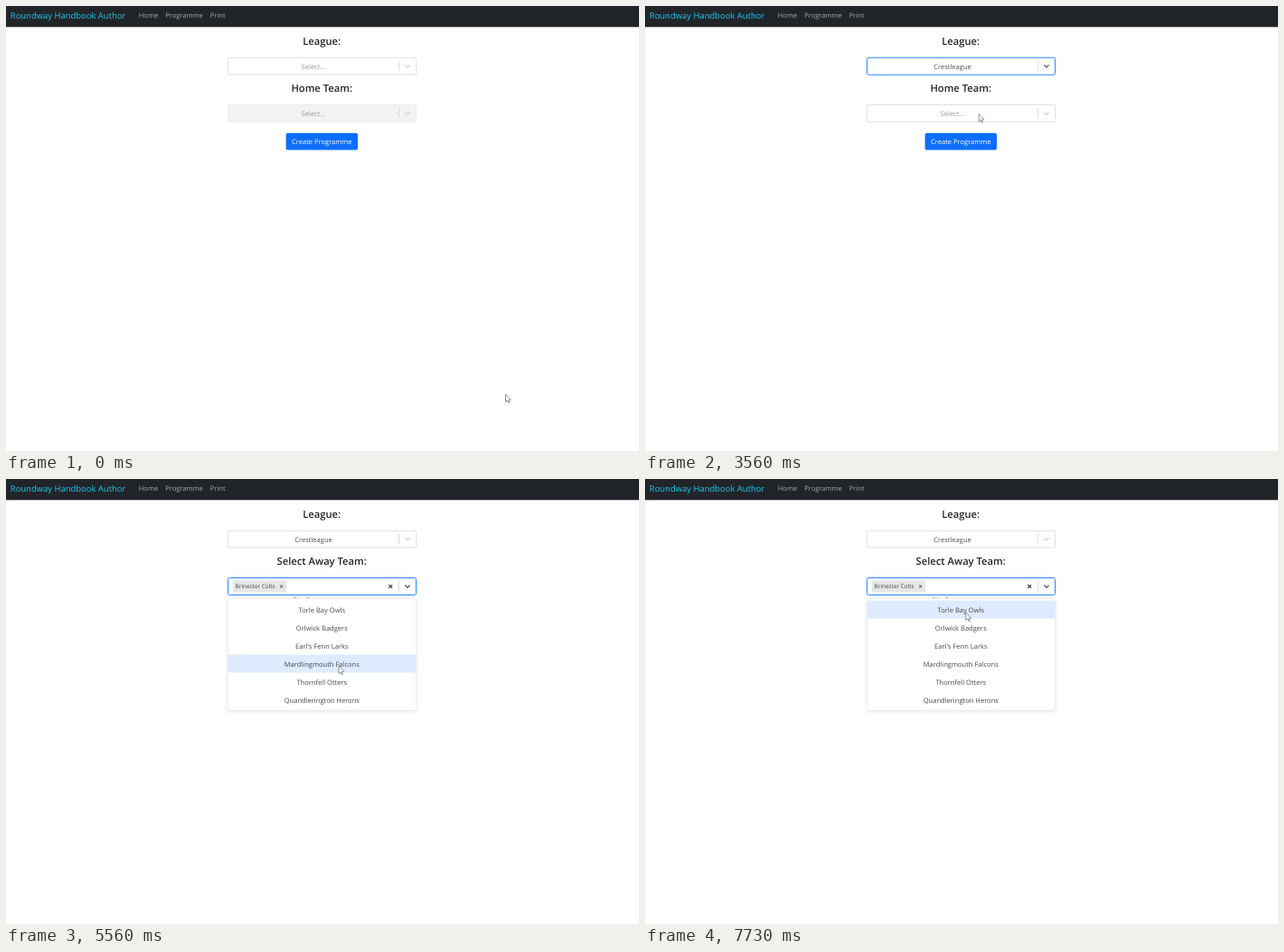
An HTML page that plays this animation: 700 by 493 pixels, repeating every 8 s.

```html
<!DOCTYPE html>
<html lang="en">
<head>
<meta charset="utf-8">
<title>Programme form</title>
<style>
  html, body { margin: 0; width: 100%; height: 100%; overflow: hidden; background: #fff; }
  svg { display: block; width: 700px; height: 493px; }
  text { font: 7.56px "Open Sans", "Noto Sans", sans-serif; text-rendering: geometricPrecision; fill: #484848; }
  .mid { text-anchor: middle; }
  .brand { font-size: 9.45px; font-weight: 500; fill: #1cc6f0; }
  .nav { fill: #a6a8aa; }
  .head { font-size: 11.2px; font-weight: 600; fill: #212529; }
  .small { font-size: 6.43px; }
  .menu { fill: #fff; stroke: #000; stroke-opacity: .1; stroke-width: .6; filter: drop-shadow(0 1.8px 2.5px rgba(0, 0, 0, .1)); }
</style>
</head>
<body>
<svg id="stage" viewBox="0 0 700 493"></svg>
<script>
const LOOP = 8000;
const NS = "http://www.w3.org/2000/svg";
const stage = document.getElementById("stage");
const LEAGUES = ["Crestleague", "Meadowseries", "Regional Improvement Circuit"];
const TEAMS = ["Torle Bay Owls", "Orlwick Badgers", "Earl's Fenn Larks", "Brinester Colts",
  "Mardlingmouth Falcons", "Thornfell Otters", "Quandlerington Herons"];
const PICK = 3;

function add(tag, attrs, parent = stage) {
  const el = document.createElementNS(NS, tag);
  set(el, attrs);
  return parent.appendChild(el);
}
function set(el, attrs) {
  for (const k in attrs) el.setAttribute(k, attrs[k]);
}
function label(str, x, y, cls, parent) {
  const el = add("text", { x, y, class: cls }, parent);
  el.textContent = str;
  return el;
}
function show(el, on) {
  el.style.display = on ? "" : "none";
}
const clamp = v => Math.max(0, Math.min(1, v));
const within = (t, a, b) => t >= a && t < b;
function mix(a, b, k) {
  return `rgb(${a.map((v, i) => Math.round(v + (b[i] - v) * k))})`;
}

// Select control; y is the top edge
function makeSelect(y) {
  const box = add("rect", { rx: 2 });
  const value = label("Select...", 340, y + 12.7, "mid");
  const line = add("path", { d: `M434.5 ${y + 4}v11`, stroke: "#d2d2d2", "stroke-width": .8 });
  const arrow = add("path", {
    d: `M441.7 ${y + 8.8}l2.3 2.3l2.3-2.3`, fill: "none",
    "stroke-width": 1.2, "stroke-linecap": "round", "stroke-linejoin": "round"
  });
  const caret = add("path", { stroke: "#555", "stroke-width": .6 });
  return { y, box, value, line, arrow, caret };
}

// focus runs from 0 (idle) to 1 (blue outline)
function drawSelect(s, { focus = 0, touched = false, enabled = 1, text, caretX = 0 }) {
  const idle = touched ? [175, 175, 175] : [210, 210, 210];
  const w = .7 + focus * .3;
  set(s.box, {
    x: 245 + w / 2, y: s.y - focus * .2 + w / 2, width: 209 - w, height: 19.4 + focus * .6 - w,
    fill: mix([242, 242, 242], [255, 255, 255], enabled),
    stroke: enabled < 1 ? mix([230, 230, 230], idle, enabled) : mix(idle, [38, 132, 255], focus),
    "stroke-width": w
  });
  s.value.textContent = text;
  s.value.style.fill = text === "Select..." ? "#969696" : "#505050";
  set(s.arrow, { stroke: mix([208, 208, 208], [85, 85, 85], focus) });
  show(s.caret, caretX > 0);
  set(s.caret, { d: `M${caretX} ${s.y + 4}v11` });
}

// Dropdown list; y is the top edge
function makeMenu(y, items) {
  const g = add("g", {});
  add("rect", { x: 245.3, y, width: 208.4, height: items.length * 20 + 4, rx: 2, class: "menu" }, g);
  const bar = add("rect", { x: 245.3, width: 208.4, height: 20 }, g);
  items.forEach((s, i) => label(s, 349.3, y + 14.9 + i * 20, "mid", g));
  return { g, y, bar, count: items.length };
}
function drawMenu(m, on, pointerY, pressed) {
  show(m.g, on);
  const row = Math.max(0, Math.min(m.count - 1, Math.floor((pointerY - m.y - 2) / 20)));
  set(m.bar, { y: m.y + 2 + row * 20, fill: pressed ? "#b2d4ff" : "#deebff" });
}

// Static page
add("rect", { width: 700, height: 493, fill: "#fff" });
add("rect", { width: 700, height: 23.3, fill: "#212529" });
label("Roundway Handbook Author", 4.8, 13.5, "brand");
label("Home", 146.8, 12.7, "nav");
label("Programme", 176.2, 12.7, "nav");
label("Print", 225.8, 12.7, "nav");
label("League:", 349.2, 42.9, "head mid");
const heading = label("Home Team:", 349.2, 95.2, "head mid");
add("rect", { x: 309.6, y: 140.8, width: 79.4, height: 18.7, rx: 2, fill: "#0d6efd" });
label("Create Programme", 349.3, 153, "mid").style.fill = "#fff";

const league = makeSelect(56.9);
const team = makeSelect(109.2);

// Chosen team chip, with remove and clear crosses
const chip = add("g", {});
add("rect", { x: 250.8, y: 112.4, width: 59.2, height: 13, rx: 1, fill: "#e6e6e6" }, chip);
label(TEAMS[PICK], 253.6, 121.3, "small", chip);
const cross = (x, y, r, w) => add("path", {
  d: `M${x - r} ${y - r}l${2 * r} ${2 * r}m0 ${-2 * r}l${-2 * r} ${2 * r}`, stroke: "#333", "stroke-width": w
}, chip);
cross(304.6, 119, 1.4, .9);
cross(425.2, 119, 1.9, 1.2);
add("path", { d: "M318 131.5h3m2 .2h1.5m8-.2h2.5", stroke: "#aaa", "stroke-width": .8, fill: "none" }, chip);

const leagueMenu = makeMenu(80, LEAGUES);
const homeMenu = makeMenu(132.6, TEAMS);
const awayMenu = makeMenu(132.6, TEAMS.filter((_, i) => i !== PICK));

const spot = add("circle", { r: 6.2, fill: "#f7e72c", "fill-opacity": .66 });
const pointer = add("path", {
  d: "M0 0V8.6L2 6.8L3.3 9.7L4.5 9.2L3.2 6.4L5.8 6.2Z",
  fill: "#fff", stroke: "#666", "stroke-width": .7, "stroke-linejoin": "round"
});

// Pointer stops: time, x, y, eased
const PATH = [
  [0, 552.5, 430], [20, 552.5, 430], [840, 300, 71, 1], [900, 309.5, 70],
  [1640, 309.5, 70], [2170, 327.5, 91.5, 1],
  [3020, 327.5, 91.5], [3140, 342, 91], [3280, 373.5, 117],
  [3360, 373.5, 117], [3620, 368.5, 120, 1],
  [4210, 368.5, 120], [4280, 371, 136], [4820, 371, 199], [4960, 368, 207, 1],
  [6770, 368, 207], [6830, 368.3, 206], [6950, 367.5, 205],
  [7160, 367.5, 205], [7730, 354.8, 148, 1], [LOOP, 354.8, 148]
];
function pointerAt(t) {
  const i = Math.max(1, PATH.findIndex(p => p[0] > t));
  const [t0, x0, y0] = PATH[i - 1];
  const [t1, x1, y1, eased] = PATH[i];
  let k = clamp((t - t0) / (t1 - t0));
  if (eased) k = k * k * (3 - 2 * k);
  return [x0 + (x1 - x0) * k, y0 + (y1 - y0) * k];
}

// Caret toggles every 535 ms from the moment of focus
const blink = (t, start) => Math.floor((t - start) / 535) % 2 === 0;

function render(t) {
  const [x, y] = pointerAt(t);
  const leagueOpen = within(t, 1360, 2760);
  const away = t >= 5560;
  const press = [[1360, 1560], [2630, 2820], [3760, 3960], [5500, 5560]].some(p => within(t, ...p));

  drawSelect(league, {
    focus: t < 3760 ? clamp((t - 1365) / 65) : 0,
    touched: within(t, 1360, 3760),
    text: t < 2760 ? "Select..." : LEAGUES[0],
    caretX: leagueOpen && blink(t, 1360) ? 251.4 : 0
  });
  drawSelect(team, {
    focus: clamp((t - 3765) / 65),
    touched: t >= 3760,
    enabled: clamp((t - 2750) / 70),
    text: away ? "" : "Select...",
    caretX: t >= 3760 && blink(t, 3760) ? (away ? 312.6 : 251.4) : 0
  });
  heading.textContent = away ? "Select Away Team:" : "Home Team:";
  show(chip, away);

  drawMenu(leagueMenu, leagueOpen, y, t >= 2630);
  drawMenu(homeMenu, within(t, 3760, 5560), y, t >= 5500);
  drawMenu(awayMenu, away, y, false);

  show(spot, press);
  set(spot, { cx: x - .5, cy: y + .5 });
  set(pointer, { transform: `translate(${x} ${y})` });
}

const start = performance.now();
function tick() {
  render((performance.now() - start) % LOOP);
  requestAnimationFrame(tick);
}
render(0);
requestAnimationFrame(tick);
</script>
</body>
</html>
```
